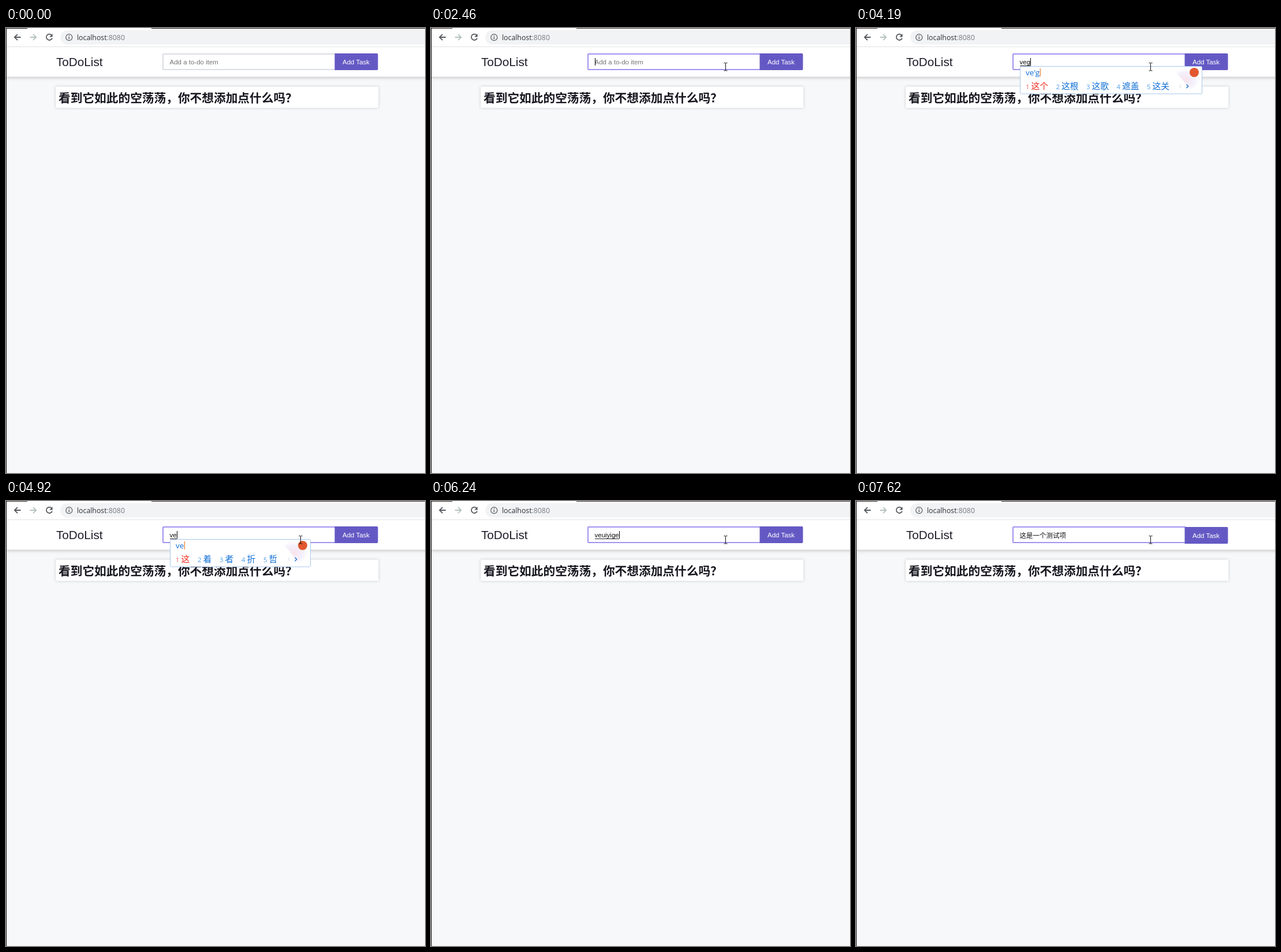
Animation, 726 px wide and 771 px high, one loop 8 s. Source, as an HTML page:

```html
<!DOCTYPE html>
<html lang="zh-CN">
<head>
<meta charset="utf-8">
<title>ToDoList</title>
<style>
  html, body { margin: 0; width: 100%; height: 100%; overflow: hidden; background: #f7f8fa; }
  svg { display: block; width: 726px; height: 771px; }
  text { font-family: "Liberation Sans", "Noto Sans CJK SC", "Noto Sans CJK", sans-serif; white-space: pre; }
  .field { font-size: 11.5px; }
  .url { font: 12.3px "Open Sans", "Noto Sans", sans-serif; }
  .head { font: bold 20.7px "Noto Sans CJK SC", "Noto Sans CJK", sans-serif; font-feature-settings: "halt" 0, "chws" 0; }
  .pinyin { font: 13.5px "Open Sans", "Noto Sans", sans-serif; fill: #0f6fd6; }
  .num { font: 11.5px "Open Sans", "Noto Sans", sans-serif; fill: #4f9fe8; }
  .word { font: 14.8px "Noto Sans CJK SC", "Noto Sans CJK", sans-serif; fill: #0f6fd6; }
  .first.num { fill: #f4695c; }
  .first.word { fill: #ef2b1d; }
  .card { filter: drop-shadow(0 0 2px rgba(0, 0, 0, .2)); }
  .header { filter: drop-shadow(0 1px 3px rgba(0, 0, 0, .26)); }
  .line { fill: none; stroke: #55595d; stroke-width: 1.8; }
</style>
</head>
<body>
<svg viewBox="0 0 726 771">
  <defs>
    <radialGradient id="glow">
      <stop offset="0" stop-color="#f6d9e6" stop-opacity=".75"/>
      <stop offset=".6" stop-color="#e9e4fa" stop-opacity=".5"/>
      <stop offset="1" stop-color="#fff" stop-opacity="0"/>
    </radialGradient>
  </defs>

  <rect width="726" height="771" fill="#f7f8fa"/>
  <rect class="header" x="-10" y="20" width="746" height="64.5" fill="#fff"/>
  <rect width="726" height="32" fill="#fff"/>
  <rect y="32" width="726" height="1" fill="#e1e2e4"/>
  <rect x="94" y="4" width="660" height="24.5" rx="12.2" fill="#f1f3f4"/>
  <rect id="top" width="726" height="1"/>
  <rect x="37" width="215" height="1" fill="#fff"/>

  <path class="line" d="M25.5 16H15M20 10.8 14.8 16 20 21.2"/>
  <path class="line" style="stroke:#b4c2bc" d="M41.5 16H52M47 10.8 52.2 16 47 21.2"/>
  <path class="line" d="M79 12.3A5.2 5.2 0 1 0 80 17.6"/>
  <path d="M80.6 10V15.4H75.2Z" fill="#55595d"/>
  <circle class="line" style="stroke-width:1.2" cx="109.3" cy="16.2" r="5.5"/>
  <path class="line" style="stroke-width:1.4" d="M109.3 15.4V19.3M109.3 12.8V14.2"/>
  <text class="url" x="123" y="20.5" fill="#2c2f33">localhost<tspan fill="#777b80">:8080</tspan></text>

  <text x="87" y="65.5" font-size="20.7" fill="#1c1c28">ToDoList</text>
  <rect id="box" x="272" y="45" width="299" height="27" rx="1" fill="#fff" stroke-width="2"/>
  <g id="button">
    <path d="M569.5 44H642.5Q644.5 44 644.5 46V71Q644.5 73 642.5 73H569.5Z" fill="#6459c4"/>
    <text class="field" x="583" y="63" fill="#fff">Add Task</text>
  </g>
  <text id="hint" class="field" x="283.5" y="63" fill="#757575">Add a to-do item</text>
  <g id="entry">
    <text id="typed" class="field" x="283.5" y="63" fill="#111"></text>
    <rect id="under" y="65" height="1" fill="#222"/>
    <rect id="caret" y="52" width="1" height="13" fill="#000"/>
  </g>

  <rect class="card" x="86" y="101.5" width="559.5" height="37" rx="1.5" fill="#fff"/>
  <text class="head" x="91" y="129" fill="#16161f">看到它如此的空荡荡，你不想添加点什么吗？</text>

  <g id="popup">
    <rect id="panel" x=".5" y="66.5" height="47.5" rx="2" fill="#fff" stroke="#a9c7ee"/>
    <g id="corner">
      <path d="M-58 67H-1V113H-20Q-28 92 -58 67Z" fill="url(#glow)"/>
      <circle cx="-14" cy="77" r="8" fill="#e2572f"/>
      <path d="M-36.5 98 -39.5 101 -36.5 104" fill="none" stroke="#cbd6e2"/>
      <path d="M-27.5 97.7 -24.2 101 -27.5 104.3" fill="none" stroke="#1b6fd0" stroke-width="1.3"/>
    </g>
    <text id="pinyin" class="pinyin" x="10" y="82"></text>
    <rect id="bar" y="70" width="1.2" height="14" fill="#ee7a2e"/>
    <g id="list"></g>
  </g>

  <path id="arrow" d="M.5 .5V14.2L3.6 11.3 5.8 16.4 8 15.5 5.8 10.5H10.8Z" fill="#fff" stroke="#000"/>
  <path id="beam" d="M-3 -6.5H-1Q0 -6.5 0 -5.5Q0 -6.5 1 -6.5H3M0 -6V6.5M-3 7H-1Q0 7 0 6Q0 7 1 7H3" fill="none" stroke="#111"/>
  <rect width="1" height="771" fill="#111"/>
</svg>

<script>
const LOOP = 8000;
const $ = id => document.getElementById(id);
const set = (id, attrs) => { for (const k in attrs) $(id).setAttribute(k, attrs[k]); };
const show = (id, on) => set(id, { visibility: on ? 'visible' : 'hidden' });
const move = (id, x, y) => set(id, { transform: `translate(${x} ${y})` });

const PAIR = '这个 这根 这歌 遮盖 这关';
const ONE = '这 着 者 折 哲';
const YES = '这是 这时 这事 这使 折射';

// time, committed text, letters being composed, popup spelling, candidates
const steps = [
  [0, '', ''],
  [3480, '', 'v', 'v', '这 中 只 在 张'],
  [3860, '', 've', 'v', '这 中 只 在 张'],
  [3930, '', 've', 've', ONE],
  [4190, '', 'veg', "ve'g", PAIR],
  [4260, '', 'vege', "ve'ge", '这个 这各 这格 着各 这歌'],
  [4650, '', 'veg', "ve'ge", '这个 这各 这格 着各 这歌'],
  [4720, '', 'veg', "ve'g", PAIR],
  [4850, '', 've', "ve'g", PAIR],
  [4920, '', 've', 've', ONE],
  [5110, '', 'veu', "ve'u", '这是 这谁 这说 这书 这时'],
  [5180, '', 'veui', "ve'ui", YES],
  [5710, '', 'veuiy', "ve'ui'y", '这是一 这是 这时 这事 这使'],
  [6040, '', 'veuiyig', "ve'ui'yi'g", '这是一个 这是一 这是以 这时一 这事一'],
  [6240, '', 'veuiyige'],
  [6310, '这是一个', ''],
  [6380, '这是一个', 'c', 'c', '从 才 次 此 曾'],
  [6560, '这是一个', 'ceu', "ce'u", '测试 测速 测算 侧身 策士'],
  [6650, '这是一个', 'ceuix', "ce'ui'x", '测试项 测试型 测试 侧室 策士'],
  [6750, '这是一个', 'ceuixd', "ce'ui'xd", '测试项 测试像 测试想 测试向 测试香'],
  [7030, '这是一个', 'ceuixd'],
  [7110, '这是一个测试项', '']
];

function fillList(words) {
  let x = 10, out = '';
  words.forEach((w, i) => {
    const c = i ? '' : 'first ';
    out += `<text class="${c}num" x="${x}" y="105.5">${i + 1}</text>` +
           `<text class="${c}word" x="${x + 9.5}" y="106.3">${w}</text>`;
    x += 23.5 + 14.5 * w.length;
  });
  $('list').innerHTML = out;
  return Math.round(x + 43.5);
}

function drawEntry([, done, comp, spell, words]) {
  const typed = $('typed');
  typed.textContent = done;
  const start = 283.5 + (done ? typed.getComputedTextLength() : 0);
  typed.textContent = done + comp;
  const end = 283.5 + (done + comp ? typed.getComputedTextLength() : 0);
  set('under', { x: start + .5, width: end - start });
  set('caret', { x: Math.round(end) });
  show('under', comp);
  show('hint', !done && !comp);
  const drop = done ? 1 : 0;
  move('entry', 0, drop);
  move('button', 0, drop);

  show('popup', words);
  if (!words) return;
  const width = fillList(words.split(' '));
  move('popup', done ? 327 : 284, 0);
  move('corner', width, 0);
  set('panel', { width: width - 1 });
  $('pinyin').textContent = spell;
  set('bar', { x: 10.5 + $('pinyin').getComputedTextLength() });
}

function pointer(t) {
  if (t < 190) return null;
  if (t < 1030) {
    const u = Math.min(9, Math.floor((t - 190) / 67.7)) / 9, v = 1 - u;
    return [421 * v * v + 2 * 745 * u * v + 551 * u * u,
            727 * v * v + 2 * 330 * u * v + 92 * u * u];
  }
  const k = Math.min(5, Math.floor((t - 1030) / 55) + 1) / 5;
  const e = k * (2 - k);
  return [551 - 41 * e, 92 - 25 * e];
}

function caretOn(t) {
  if (t < 1480) return false;
  if (t < 3480) return t < 1940 || (t >= 2460 && t < 2990);
  return t < 7620;
}

let last = null;
function draw(t) {
  const step = steps.findLast(s => s[0] <= t);
  if (step !== last) drawEntry(last = step);
  show('caret', caretOn(t));
  set('box', { stroke: t < 1430 ? '#dadde3' : t < 1480 ? '#bdb5ea' : '#a292ef' });
  set('top', { fill: t < 1430 ? '#0c0c0c' : '#3a2d28' });

  const p = pointer(t), inside = p && p[1] < 73;
  show('arrow', p && !inside);
  show('beam', inside);
  if (p) move(inside ? 'beam' : 'arrow', Math.round(p[0]) + (inside ? .5 : 0), Math.round(p[1]));
}

const begin = performance.now();
function tick() {
  draw((performance.now() - begin) % LOOP);
  requestAnimationFrame(tick);
}
tick();
</script>
</body>
</html>
```
